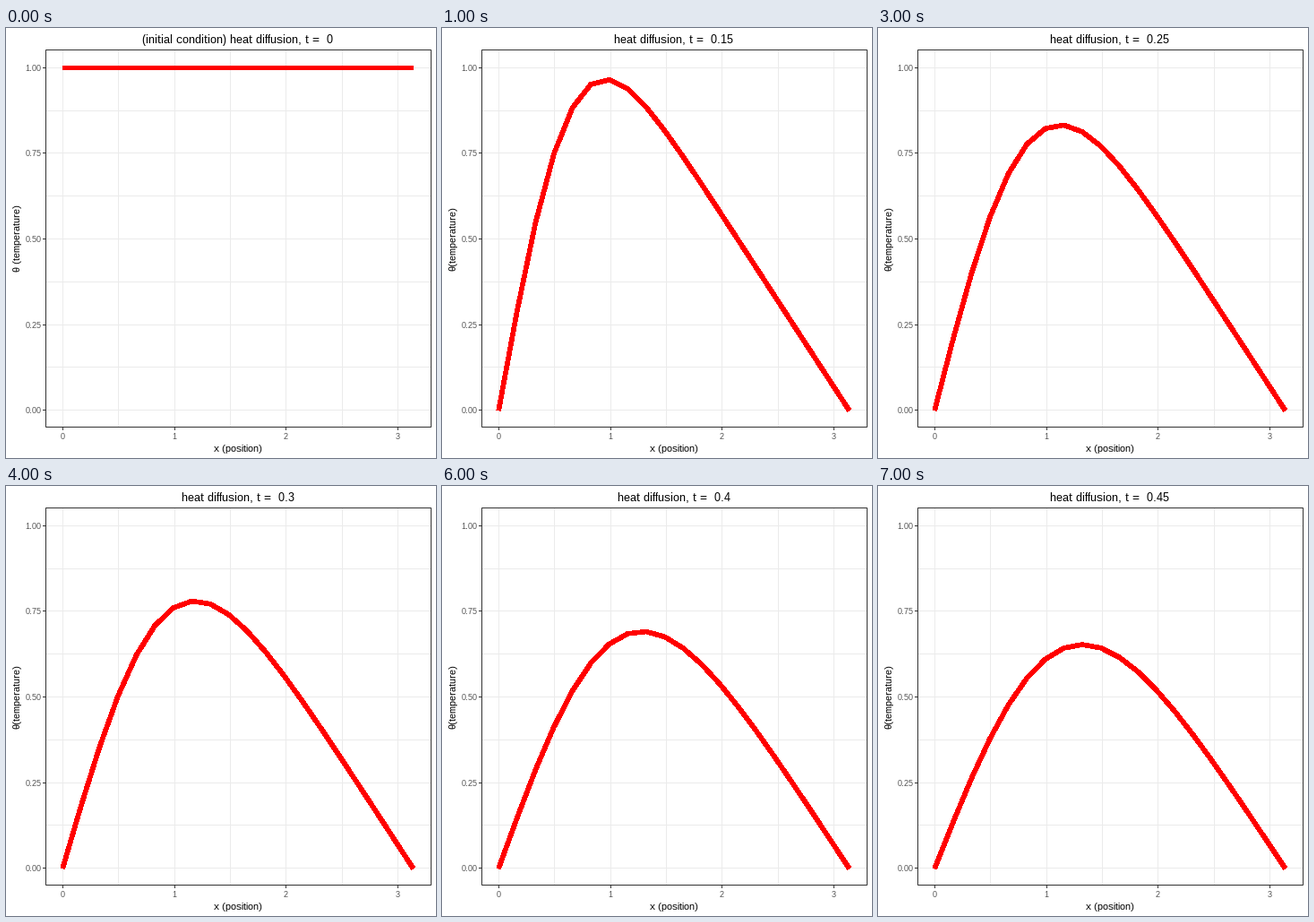
These frames come from a looping animation (480 px wide and 480 px high, 8000 ms). A matplotlib script:

```python
import numpy as np
import matplotlib.pyplot as plt
from matplotlib.animation import FuncAnimation
from matplotlib.patches import Rectangle

SIZE, DPI = 480, 80
PX = 72 / DPI  # points per pixel
LEFT, RIGHT, TOP, BOTTOM = 44.5, 474.5, 24.5, 445.5
GRID, EDGE, TICK_TEXT = "#ebebeb", "#333333", "#4d4d4d"
TIMES = [0] + [0.15 + 0.05 * k for k in range(7)]

# Full hinting keeps small glyphs on whole pixels
plt.rcParams.update({"font.family": "Liberation Sans",
                     "text.hinting": "native", "text.hinting_factor": 1})

fig = plt.figure(figsize=(SIZE / DPI, SIZE / DPI), dpi=DPI, facecolor="white")
ax = fig.add_axes([0, 0, 1, 1])
ax.set_xlim(0, SIZE)
ax.set_ylim(SIZE, 0)
ax.axis("off")


def to_x(x):
    return 63.25 + 124.52 * np.asarray(x)


def to_y(y):
    return 426.75 - 382.45 * np.asarray(y)


def pixel_center(v):
    return np.floor(v) + 0.5


def segment(x0, y0, x1, y1, color, z):
    ax.plot([x0, x1], [y0, y1], color=color, lw=PX, solid_capstyle="butt",
            snap=False, zorder=z)


def label(x, y, text, size, color="black", **kw):
    return ax.text(x, y, text, fontsize=size * PX, color=color,
                   va="baseline", zorder=5, **{"ha": "center", **kw})


# Grid, ticks and tick labels
for v in np.arange(0, 3.01, 0.5):
    x = pixel_center(to_x(v) + 0.46)
    segment(x, TOP, x, BOTTOM, GRID, 1)
    if v == int(v):
        segment(x, BOTTOM, x, BOTTOM + 3.5, EDGE, 4)
        label(x - 0.5, 459, f"{v:.0f}", 9, TICK_TEXT)
for k in range(9):
    y = pixel_center(to_y(k / 8))
    segment(LEFT, y, RIGHT, y, GRID, 1)
    if k % 2 == 0:
        segment(LEFT - 3.5, y, LEFT, y, EDGE, 4)
        label(39.5, y + 3.5, f"{k / 8:.2f}", 9, TICK_TEXT, ha="right")

ax.add_patch(Rectangle((LEFT, TOP), RIGHT - LEFT, BOTTOM - TOP, fill=False,
                       ec=EDGE, lw=PX, snap=False, zorder=4))

label(259, 473, "x (position)", 11)
y_title = label(15.5, 235, "", 11, rotation=90, rotation_mode="anchor")
title = label(259, 17, "", 13)

xs = np.linspace(0, np.pi, 20)
curve, = ax.plot([], [], color="red", lw=4.6 * PX, solid_capstyle="butt",
                 solid_joinstyle="round", antialiased=False, snap=False,
                 zorder=3)


def temperature(t):
    """Fourier series solution on the rod; uniform before diffusion starts."""
    if t == 0:
        return np.ones_like(xs)
    n = np.arange(1, 60)[:, None]
    return (np.exp(-n**2 * t) * np.sin(n * xs) / n).sum(axis=0)


def update(i):
    t = TIMES[i]
    curve.set_data(to_x(xs), to_y(temperature(t)))
    prefix = "(initial condition) " if i == 0 else ""
    title.set_text(f"{prefix}heat diffusion, t =  {t:g}")
    y_title.set_text("θ (temperature)" if i == 0 else "θ(temperature)")
    return curve, title, y_title


anim = FuncAnimation(fig, update, frames=len(TIMES), interval=1000,
                     repeat=True, repeat_delay=0)
plt.show()
```
